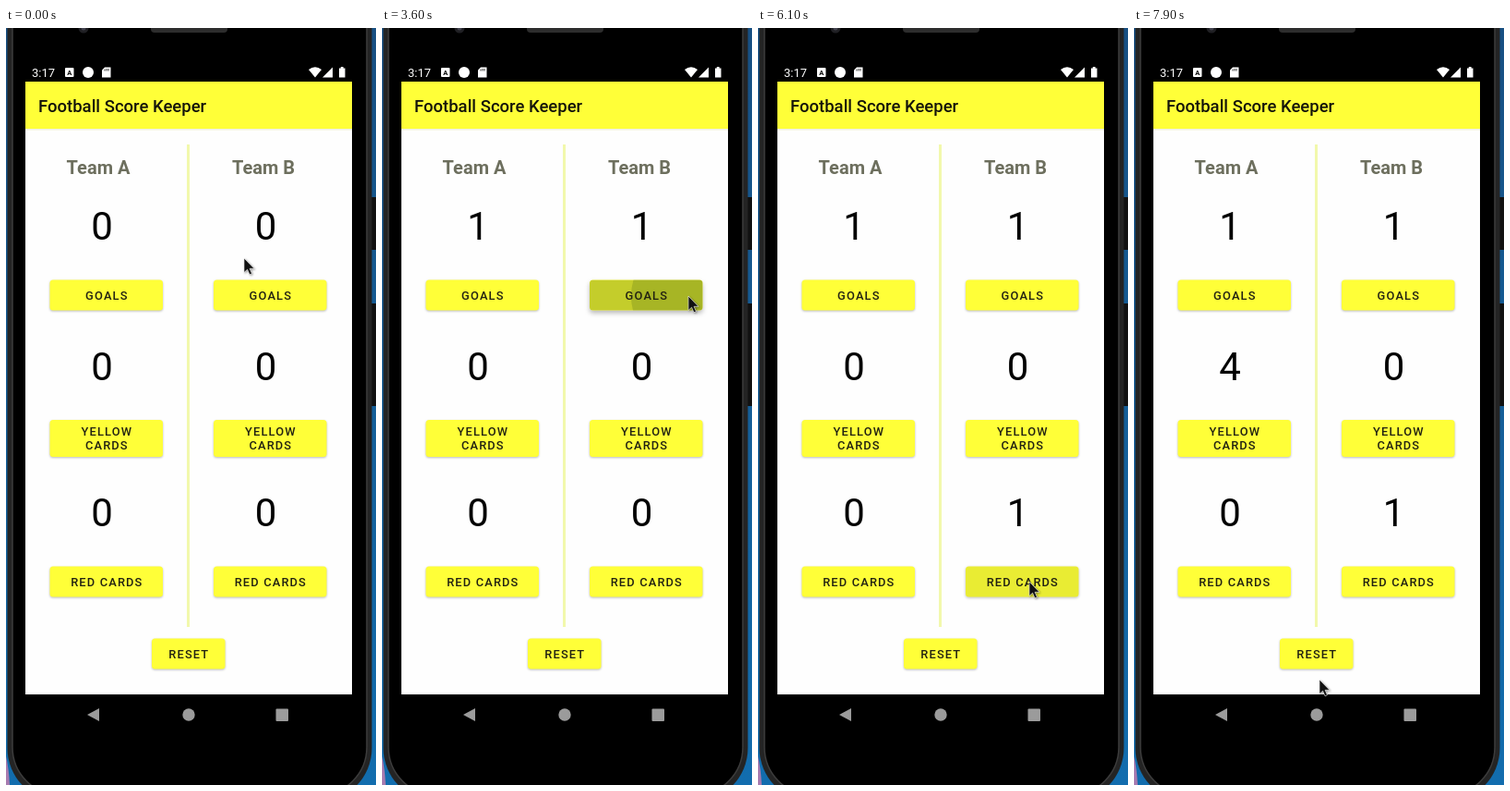
These frames come from a looping animation (401x819 px, 8 s). An HTML page:

```html
<!DOCTYPE html>
<html lang="en">
<head>
<meta charset="utf-8">
<title>Score keeper</title>
<style>
  html, body { margin: 0; width: 100%; height: 100%; overflow: hidden; background: #000; }
  svg { display: block; font-family: Roboto, sans-serif; }
  .title { font-size: 18.5px; font-weight: 500; fill: #14140a; }
  .team { font-size: 20px; font-weight: 700; fill: #6d6f5e; text-anchor: middle; }
  .score { font-size: 42px; fill: #000; text-anchor: middle; }
  .label { font-size: 12.85px; font-weight: 500; letter-spacing: 1.15px; fill: #222212; text-anchor: middle; }
</style>
</head>
<body>
<svg width="401" height="819" viewBox="0 0 401 819">
  <defs>
    <linearGradient id="wall" x2="0" y2="1">
      <stop offset="0" stop-color="#174f82"/><stop offset="1" stop-color="#126dae"/>
    </linearGradient>
  </defs>

  <!-- desktop and phone body -->
  <rect width="401" height="819" fill="url(#wall)"/>
  <path d="M0 788Q3 800 4 819H0Z" fill="#a77bb0"/>
  <path d="M396 183h5v57h-5zM396 298h5v111h-5z" fill="#111"/>
  <rect x="1.5" y="-80" width="395" height="917" rx="58" fill="#242424"/>
  <rect x="7" y="-80" width="384" height="910" rx="52" fill="#000" stroke="#3c3c3c" stroke-width="1.5"/>
  <circle cx="84" cy="0" r="5.5" fill="#202024"/>
  <circle cx="84" cy="0" r="2.5" fill="#444450"/>
  <rect x="157" y="-6" width="83" height="11" rx="4" fill="#2d2d2d"/>

  <!-- status bar -->
  <g fill="#fff">
    <text x="28" y="52.5" font-size="13">3:17</text>
    <rect x="64" y="43" width="9.5" height="10" rx="1"/>
    <text x="68.7" y="51" font-size="7.5" font-weight="700" text-anchor="middle" fill="#000">A</text>
    <circle cx="89" cy="48" r="6"/>
    <path d="M107 42.5h6.5v11h-9.5v-8z"/>
    <path d="M328 45Q335 39.5 342 45L335 53.5Z"/>
    <path d="M354 42.5V53.5H343Z"/>
    <path d="M361 43.5h1.8v-1.5h2.8v1.5h1.9v10h-6.5z"/>
    <path d="M107 44.5v2M109 44v2.5M111 44v2.5" stroke="#000" stroke-width=".8"/>
  </g>

  <!-- app screen -->
  <rect x="21" y="58" width="354" height="663" fill="#fefefe"/>
  <rect x="21" y="109" width="354" height="1.5" fill="#f0f0e0"/>
  <rect x="21" y="58" width="354" height="51" fill="#ffff38"/>
  <text class="title" x="35" y="91">Football Score Keeper</text>
  <rect x="196" y="126" width="3" height="522" fill="#f2f8ac"/>
  <text class="team" x="100" y="157.5">Team A</text>
  <text class="team" x="279" y="157.5">Team B</text>
  <g id="app"></g>

  <!-- navigation bar -->
  <g fill="#9b9b9b">
    <path d="M88 743L101 736V750Z"/>
    <circle cx="198" cy="743" r="6.7"/>
    <rect x="292.5" y="736.5" width="13.5" height="13.5" rx="1"/>
  </g>

  <path id="cursor" d="M0 0V15.5L3.6 12.2 6 17.8 8.5 16.7 6.1 11.3H11Z" fill="#111"
    stroke="#fff" stroke-width=".6" style="filter:drop-shadow(1px 1px 1px #0006)"/>
</svg>

<script>
const LOOP = 8000, STEP = 100, FADE_FROM = 250, FADE_TO = 450;
const COLUMN = 177.5, SCORE_GAP = 43.3;
const app = document.getElementById('app');
const cursor = document.getElementById('cursor');

// Each move eases out from the place where the one before it came to rest.
const start = [258, 249];
const moves = [
  { from: 1100, to: 1500, tip: [107, 332] },
  { from: 1600, to: 2000, tip: [113, 281] },
  { from: 2500, to: 2600, tip: [116, 283] },
  { from: 2700, to: 2900, tip: [332, 290] },
  { from: 3900, to: 4300, tip: [297, 577] },
  { from: 4300, to: 4600, tip: [331, 615] },
  { from: 4700, to: 4900, tip: [293, 610] },
  { from: 5400, to: 5600, tip: [294, 599] },
  { from: 6100, to: 6500, tip: [109, 446] },
  { from: 7500, to: 7600, tip: [163, 567] },
  { from: 7700, to: 7900, tip: [201, 705] }
];

const clamp = v => Math.max(0, Math.min(1, v));
const easeOut = k => 1 - (1 - k) ** 2;

function pointerAt(t) {
  return moves.reduce((at, { from, to, tip }) => {
    const k = easeOut(clamp((t - from) / (to - from)));
    return at.map((v, i) => v + (tip[i] - v) * k);
  }, start);
}

function add(parent, name, attrs, text = '') {
  const el = document.createElementNS('http://www.w3.org/2000/svg', name);
  for (const key in attrs) el.setAttribute(key, attrs[key]);
  el.textContent = text;
  return parent.appendChild(el);
}

let clipCount = 0;

function makeButton(x, y, width, lines, presses = []) {
  const height = lines.length > 1 ? 40 : 33;
  const box = { x, y, width, height, rx: 3.5 };
  const id = 'clip' + clipCount++;
  add(add(app, 'clipPath', { id }), 'rect', box);
  const face = add(app, 'rect', { ...box, fill: '#ffff38' });
  const ink = add(app, 'g', { 'clip-path': `url(#${id})`, fill: '#002800' });
  add(ink, 'rect', { ...box, opacity: .23 });
  const ripple = add(ink, 'circle', { opacity: .15 });
  lines.forEach((line, i) => {
    const dy = 4.6 + (i - (lines.length - 1) / 2) * 14.8;
    add(app, 'text', { class: 'label', x: x + width / 2 + .6, y: y + height / 2 + dy }, line);
  });
  return { face, ink, ripple, presses };
}

function makeCounter(side, y, lines, presses) {
  const x = COLUMN * side;
  const score = add(app, 'text', { class: 'score', x: 104 + x, y: y - SCORE_GAP });
  return { score, ...makeButton(47.5 + x, y, 122.5, lines, presses) };
}

const burst = Array.from({ length: 4 }, (_, i) => 6800 + 150 * i);
const rows = [
  { y: 272.5, lines: ['GOALS'], presses: [[2200], [3400]] },
  { y: 424, lines: ['YELLOW', 'CARDS'], presses: [burst, []] },
  { y: 582.5, lines: ['RED CARDS'], presses: [[], [5700]] }
];
const counters = rows.flatMap(({ y, lines, presses }) =>
  presses.map((times, side) => makeCounter(side, y, lines, times)));
const reset = makeButton(158, 660.5, 79.5, ['RESET']);

function drawButton({ face, ink, ripple, presses }, t) {
  const last = presses.filter(p => p <= t).pop() ?? -FADE_TO;
  const age = t - last;
  const glow = clamp((FADE_TO - age) / (FADE_TO - FADE_FROM));
  const [x, y] = pointerAt(last);
  ink.setAttribute('opacity', glow);
  face.style.filter = `drop-shadow(0 ${1 + 2 * glow}px ${1 + 1.5 * glow}px #0004)`;
  ripple.setAttribute('cx', x);
  ripple.setAttribute('cy', y);
  ripple.setAttribute('r', 22 + .2 * age);
}

function draw() {
  const t = Math.floor(performance.now() % LOOP / STEP) * STEP;
  for (const counter of counters) {
    counter.score.textContent = counter.presses.filter(p => p + 100 <= t).length;
    drawButton(counter, t);
  }
  drawButton(reset, t);
  cursor.setAttribute('transform', `translate(${pointerAt(t)})`);
  requestAnimationFrame(draw);
}
draw();
</script>
</body>
</html>
```
